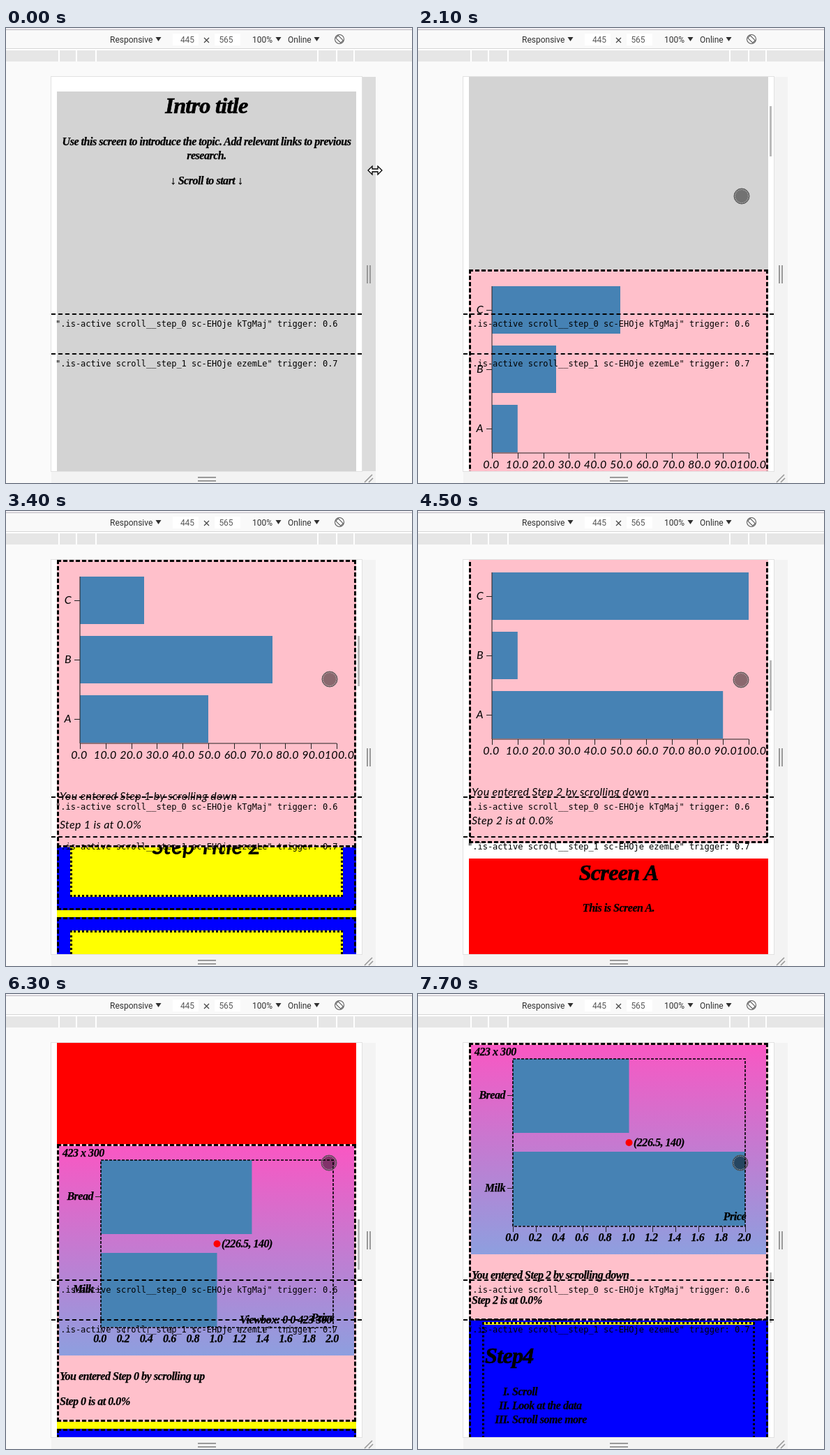
Recreate the animation shown at these times as an HTML page. Size 582 by 652 pixels, loop 8000 ms.

```html
<!DOCTYPE html>
<html lang="en">
<head>
<meta charset="utf-8">
<title>Scroll steps</title>
<style>
html, body { margin: 0; width: 100%; height: 100%; overflow: hidden; background: #fafafa; }
svg { position: absolute; left: 0; top: 0; overflow: visible; }
.stage { position: relative; width: 582px; height: 652px; overflow: hidden; }
.ui { font: 12px Roboto, sans-serif; fill: #303030; }
.port { position: absolute; left: 65px; top: 70px; width: 445px; height: 565px; overflow: hidden; isolation: isolate; background: #fff; }
.page { padding: 21px 8px 0; }
.screen { position: relative; height: 565px; background: #d3d3d3; }
.red { background: #f00; margin-top: 22px; }
.section { position: relative; background: #ff0; }
.graphic { position: sticky; top: 0; z-index: 1; box-sizing: border-box; border: 3px dashed #000; background: #ffc0cb; }
.graphic svg { left: -3px; top: -3px; }
.step { position: relative; box-sizing: border-box; margin: 10px 0 0; padding: 16px; border: 3px dashed #000; background: #00f; }
.inner { position: relative; box-sizing: border-box; height: 100%; border: 3px dotted #000; background: #ff0; }
.step.last .inner { background: linear-gradient(#ff0 4px, #00f 4px) border-box; }
.inner svg { left: -3px; top: -3px; }
.script { font: italic bold 16px "Liberation Serif", "Noto Serif", serif; letter-spacing: -.03em; }
.script text { stroke: #000; stroke-width: .25px; }
.hand { font: italic 16px Lato, sans-serif; letter-spacing: .02em; }
.big { font-size: 32px; font-weight: bold; }
.script .big { letter-spacing: -.02em; stroke-width: .7px; }
.line { position: absolute; left: 65px; width: 445px; border-top: 2px dashed #000; }
.line span { position: absolute; left: 6px; top: 5px; font: 12px/16px "DejaVu Sans Mono", monospace; white-space: pre; }
.thumb { position: absolute; left: 504px; top: 72px; width: 3px; height: 72px; background: rgba(0, 0, 0, .27); }
</style>
</head>
<body>
<div class="stage">
  <svg id="chrome" class="ui" width="582" height="652"></svg>
  <div class="port" id="port"><div class="page" id="page"></div></div>
  <div class="thumb" id="thumb"></div>
  <div class="line" style="top:409px"><span>".is-active scroll__step_0 sc-EHOje kTgMaj" trigger: 0.6</span></div>
  <div class="line" style="top:466px"><span>".is-active scroll__step_1 sc-EHOje ezemLe" trigger: 0.7</span></div>
  <svg width="582" height="652">
    <g id="resize"><path d="M-10 0l6-6v4h8v-4l6 6-6 6v-4h-8v4z" fill="#fff" stroke="#000" stroke-width="1.3"/></g>
    <g id="touch">
      <circle r="11" fill="rgba(0,0,0,.46)" stroke="#555" stroke-width="1"/>
      <circle r="9.5" fill="none" stroke="#ddd" stroke-width="1" stroke-dasharray="1 1.6"/>
    </g>
    <g id="touchRed">
      <path d="M-5-11H5L11-5V5L5 11H-5L-11 5V-5z" fill="#900" stroke="#d5f3fa" stroke-width="2"/>
    </g>
  </svg>
</div>
<script>
const $ = id => document.getElementById(id);
const text = (x, y, s, anchor = 'start', cls = '') =>
  `<text x="${x}" y="${y}" text-anchor="${anchor}" class="${cls}">${s}</text>`;
const rect = (x, y, w, h, fill, extra = '') =>
  `<rect x="${x}" y="${y}" width="${w}" height="${h}" fill="${fill}" ${extra}/>`;
const path = (d, color = '#222', width = 1) =>
  `<path d="${d}" fill="none" stroke="${color}" stroke-width="${width}"/>`;
const svg = (body, cls = '') => `<svg class="${cls}" width="429" height="412">${body}</svg>`;

// Browser toolbar, ruler and resize handles
function chrome() {
  const arrow = x => `<path d="M${x} 13h8l-4 6z"/>`;
  const seams = [75, 100, 128, 446, 473, 498].map(x => rect(x, 31, 2, 17, '#fff')).join('');
  return rect(0, 0, 582, 2, '#f3f1f4') + rect(0, 2, 582, 1, '#bdb8c0') +
    rect(0, 3, 582, 27, '#f9f9f9') + rect(0, 29, 582, 1, '#d6d6d6') + rect(0, 30, 582, 2, '#fff') +
    rect(0, 32, 582, 16, '#e6e6e6') + seams +
    rect(239, 8, 37, 17, '#fff') + rect(299, 8, 37, 17, '#fff') +
    text(149, 21, 'Responsive') + arrow(214.5) +
    `<g fill="#5a5a5a">${text(260, 21, '445', 'middle') + text(315.5, 21, '565', 'middle')}</g>` +
    path('M284 14l7 7m0-7l-7 7', '#444', 1.2) +
    text(353, 21, '100%') + arrow(386.5) + text(404, 21, 'Online') + arrow(441.5) +
    `<g transform="translate(478 16) rotate(-45)" fill="none" stroke="#555">
      <circle r="6.5"/><path d="M-2.5-5h5v10h-5z"/></g>` +
    rect(510, 70, 20, 565, '#f3f3f3', 'id="strip"') + rect(65, 635, 465, 17, '#f3f3f3') +
    rect(64, 69, 447, 567, '#e2e2e2') +
    path('M518 340v26m4-26v26', '#999', 2) + path('M275 644h26m-26 5h26', '#999', 2) +
    path('M514 651l11-11m-5 11l6-6', '#999', 1.6);
}

const bars = (n, y, step, h, x) => Array.from({ length: n }, (_, i) =>
  rect(x, y + i * step, 0, h, '#4682b4', 'class="bar"')).join('');
const status = (y1, y2) => text(4, y1, '', 'start', 'entered') + text(4, y2, '', 'start', 'at');

function handChart() {
  let s = bars(3, 24, 85, 68, 33) + path('M33 24V263H401');
  for (let i = 0; i <= 10; i++) {
    const x = 33 + i * 36.8;
    s += path(`M${Math.round(x) + .5} 263v8`) + text(x + i * .5 - 1, 285, (i * 10).toFixed(1), 'middle');
  }
  ['C', 'B', 'A'].forEach((c, i) => {
    const y = 58 + i * 85;
    s += path(`M25 ${y + .5}h8`) + text(21, y + 5, c, 'end');
  });
  return svg(s + status(344, 385), 'hand');
}

function scriptChart() {
  let s = `<defs><linearGradient id="dusk" x2="0" y2="1"><stop stop-color="#f957c3"/>
    <stop offset="1" stop-color="#8d9fdf"/></linearGradient></defs>` +
    rect(3, 3, 423, 300, 'url(#dusk)') + text(8, 18, '423 x 300') +
    text(394, 257, 'Viewbox: 0 0 423 300', 'end') + bars(2, 23, 133, 106, 63) +
    rect(63, 23, 333, 240, 'none', 'stroke="#000" stroke-width="1.6" stroke-dasharray="4 2"');
  for (let i = 0; i <= 10; i++) {
    const x = 63 + i * 33.3;
    s += path(`M${Math.round(x) + .5} 263v8`) + text(x - 1.5, 284, (i / 5).toFixed(1), 'middle');
  }
  ['Bread', 'Milk'].forEach((c, i) => {
    const y = 75 + i * 133;
    s += path(`M55 ${y + .5}h8`) + text(52, y + 5, c, 'end');
  });
  s += text(397, 254, 'Price', 'end') + '<circle cx="229.5" cy="143" r="5" fill="#f00"/>' +
    text(236, 148, '(226.5, 140)');
  return svg(s + status(338, 374), 'script');
}

const screen = (cls, lines) => `<div class="screen ${cls}">${svg(lines, 'script')}</div>`;
const stepBox = (h, body, cls = '') =>
  `<div class="step ${cls}" style="height:${h}px"><div class="inner">${body}</div></div>`;
const section = (id, h, gh, chart, steps) =>
  `<div class="section" id="${id}" style="height:${h}px">
    <div class="graphic" style="height:${gh}px">${chart}</div>${steps}</div>`;

const list = ['Scroll', 'Look at the data', 'Scroll some more'].map((s, i) =>
  text(39, 105 + i * 20, 'I'.repeat(i + 1) + '.', 'end') + text(43, 105 + i * 20, s)).join('');
const scriptTitle = n => text(4, 59, 'Step' + n, 'start', 'big');

$('chrome').innerHTML = chrome();
$('page').innerHTML =
  screen('', text(214.5, 31, 'Intro title', 'middle', 'big') +
    text(214.5, 77, 'Use this screen to introduce the topic. Add relevant links to previous', 'middle') +
    text(214.5, 97, 'research.', 'middle') + text(214.5, 133, '↓ Scroll to start ↓', 'middle')) +
  section('first', 923, 412, handChart(), [1, 2, 3].map(n =>
    stepBox(157, svg(text(195.5, 58, 'Step Title ' + n, 'middle', 'big'), 'hand'))).join('')) +
  screen('red', text(214.5, 31, 'Screen A', 'middle', 'big') + text(214.5, 76, 'This is Screen A.', 'middle')) +
  section('second', 1325, 398, scriptChart(),
    [1, 2, 3].map(n => stepBox(129, svg(scriptTitle(n), 'script'))).join('') +
    stepBox(500, svg(scriptTitle(4) + list, 'script'), 'last'));

// Runs of scroll positions: start time, then one position per 100 ms
const runs = [
  [0, 0], [1000, 5, 18, 38, 65, 95, 135, 185, 232, 272], [2100, 310, 375, 440, 490],
  [2800, 530, 570, 620, 680, 740, 790, 830], [3800, 900, 980, 1050, 1103],
  [4600, 1171], [4900, 1357], [5200, 1490], [5400, 1571], [5600, 1687], [6000, 1800, 1918],
  [6300, 1951], [6600, 1971], [6900, 2060, 2150, 2220], [7400, 2330, 2440], [7700, 2540]
];
// Pointer stops: time, x, y
const stops = [[0, 529, 204], [500, 517, 212], [600, 495, 225], [700, 480, 234],
  [800, 471, 238], [1000, 464, 241], [4500, 463, 242], [7700, 462, 242]];

const charts = [
  { id: 'first', unit: 3.68, enter: [779, 1060], data: [[50, 25, 10], [25, 75, 50], [100, 10, 90]] },
  { id: 'second', unit: 166.5, enter: [2247, 2500], data: [[1.3, 1], [1.6, 1.2], [1, 2]] }
];
for (const c of charts) {
  const root = $(c.id);
  c.bars = root.querySelectorAll('.bar');
  c.entered = root.querySelector('.entered');
  c.at = root.querySelector('.at');
}

const lastBefore = (rows, t) => rows.filter(r => r[0] <= t).pop();

function scrollAt(t) {
  const run = lastBefore(runs, t);
  return run[Math.min(run.length - 1, 1 + Math.floor((t - run[0]) / 100))];
}

function showStep(c, pos) {
  const n = c.enter.filter(e => pos >= e).length;
  if (n === c.now) return;
  c.now = n;
  c.bars.forEach((b, i) => b.setAttribute('width', c.data[n][i] * c.unit));
  c.entered.textContent = `You entered Step ${n} by scrolling ${n ? 'down' : 'up'}`;
  c.at.textContent = `Step ${n} is at 0.0%`;
}

function frame() {
  const t = performance.now() % 8000, pos = scrollAt(t);
  $('port').scrollTop = pos;
  charts.forEach(c => showStep(c, pos));
  $('thumb').style.transform = `translateY(${Math.round(pos * .1287)}px)`;
  $('thumb').style.opacity = t < 1000 ? 0 : 1;
  $('strip').setAttribute('fill', t < 500 ? '#dcdcdc' : '#f3f3f3');

  const [, x, y] = lastBefore(stops, t);
  const kind = x > 510 ? 'resize' : pos > 1360 && pos < 1912 ? 'touchRed' : 'touch';
  for (const id of ['resize', 'touch', 'touchRed']) {
    $(id).setAttribute('transform', `translate(${x} ${y})`);
    $(id).style.display = id === kind ? '' : 'none';
  }
  requestAnimationFrame(frame);
}
frame();
</script>
</body>
</html>
```
